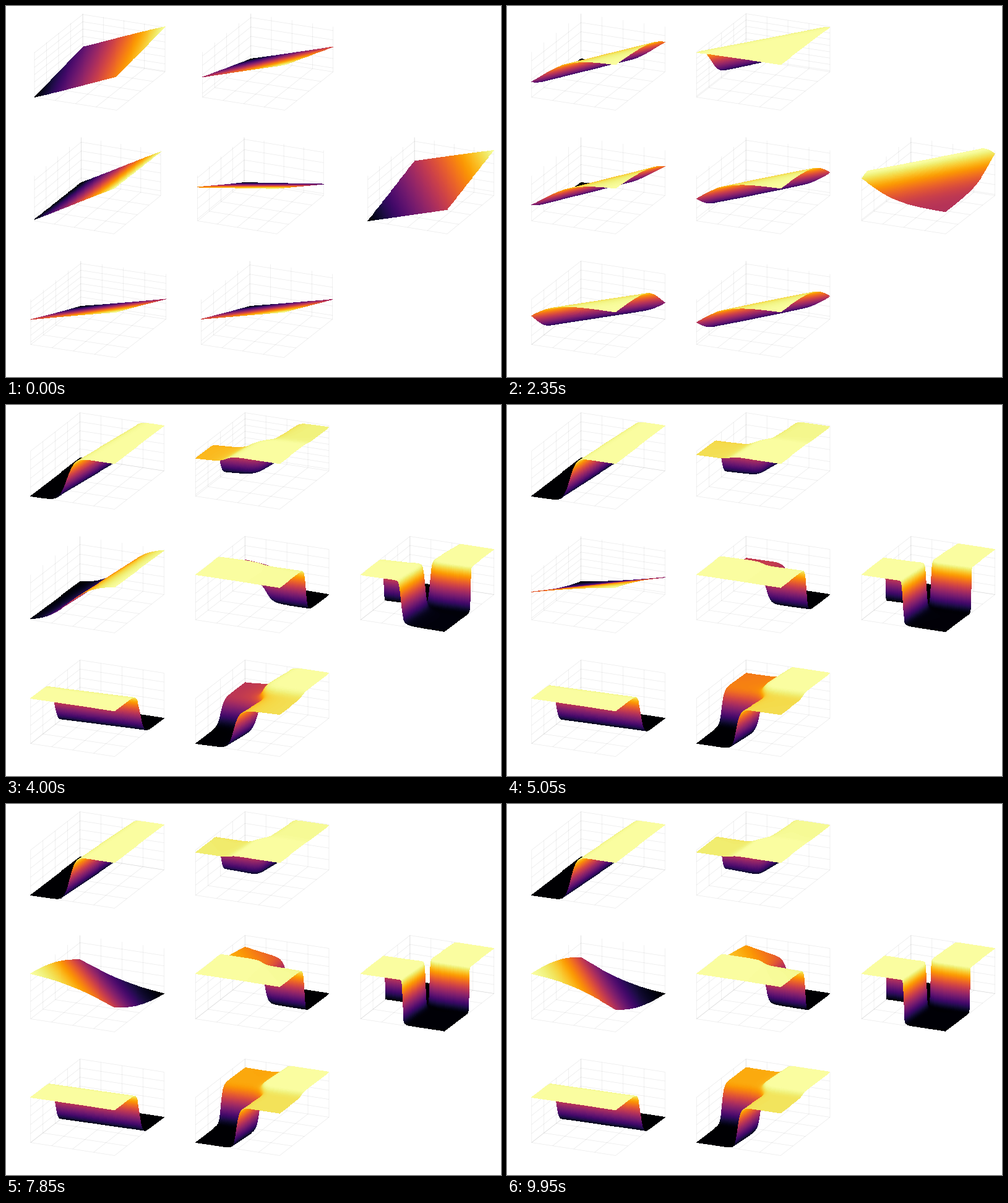
These frames come from a looping animation (800x600 px, 10 s). A matplotlib script:

```python
import matplotlib
import matplotlib.pyplot as plt
import numpy as np
from matplotlib.animation import FuncAnimation
from matplotlib.collections import LineCollection

WIDTH, HEIGHT = 800, 600
FRAMES, INTERVAL = 200, 50

# A 3-3-1 sigmoid network learns XOR over the unit square (a, b).
# Every unit starts as a tilted plane whose direction turns at first.
START_ANGLES = np.radians([20, -2, -51, -39, -71, -52, 42])
TURNED_ANGLES = np.radians([-3, -5, -53, -37, -87, -60, -23])

# First layer slopes: all fold along one diagonal, then split into a and b.
FOLD_1 = np.array([(5.7, -4.4), (5, -3.8), (5.9, -7)])
SPLIT_1 = np.array([(22, -3), (6.3, -.6), (1.3, -26)])
END_1 = np.array([(31, -2), (-3.25, -3.05), (.7, -34)])

# Second layer weights and bias; while folding only gain and bias differ.
FOLD_2 = np.outer([11, 2, 2], [.25, .25, .5, 0]) - np.outer([1, 1, 1], [0, 0, 0, 1])
SPLIT_2 = np.array([(4, .6, 3, -1), (-2.5, -1.5, 9, 0), (5, 1.5, -4, 0)])
END_2 = np.array([(6, .5, 4.2, -1.4), (-6, 2.5, 9.5, 0), (7.6, 0, -6.5, 1.5)])

# Output: the first hidden unit minus the two others.
FOLD_3 = np.array([(2, -1.08, -1.08, 0)])
SPLIT_3 = np.array([(22, -13.5, -13.5, 0)])
END_3 = np.array([(26, -16, -16, 0)])

# Boxes start narrower and widen to a common left and right end.
START_LEFT = np.array([46, 46, 40, 51, 43, 49, 51.5])
START_RIGHT = np.array([257, 250, 258.5, 262, 246.5, 261, 255])
LEFT, RIGHT = 39.8, 255.3
CELLS = [(0, 0), (0, 1), (0, 2), (1, 0), (1, 1), (1, 2), (2, 1)]
COL_STEP, ROW_STEP = 800 / 3, 200

# Oblique projection of the unit box.
SHARE_A, SHARE_B = .63, .37
FLOOR, DROP_A, RISE_B, RISE_Z = 147.5, 21, 62, 73

LUT = matplotlib.colormaps["inferno"](np.arange(256), bytes=True)

# Depth lines, one per pixel column, running from back to front.
COLUMNS, DEPTHS = 220, 120
u = np.linspace(0, 1, COLUMNS)[:, None]
back = np.minimum(1, u / SHARE_B)
front = np.maximum(0, (u - SHARE_A) / SHARE_B)
GRID_B = back + (front - back) * np.linspace(0, 1, DEPTHS + 1)
GRID_A = np.clip((u - SHARE_B * GRID_B) / SHARE_A, 0, 1)
GROUND = FLOOR + DROP_A * GRID_A - RISE_B * GRID_B
SEGMENT_U = np.repeat(u.ravel(), DEPTHS)
POINTS = np.stack([GRID_A.ravel() - .5, GRID_B.ravel() - .5])


def sigmoid(s):
    return 1 / (1 + np.exp(-s))


def progress(t, start, end):
    return min(max((t - start) / (end - start), 0), 1)


def stages(t):
    turn = progress(t, 0, 1600)
    fold = progress(t, 1600, 2350) ** 2
    split = 1 - (1 - progress(t, 2350, 4000)) ** 2
    settle = 1 - np.exp(-max(t - 4000, 0) / 1400)
    return turn, (fold, split, settle)


def pass_through(value, poses, steps):
    for pose, step in zip(poses, steps):
        value = value + (pose - value) * step
    return value


def layer(inputs, poses, steps, planes):
    w = pass_through(0, poses, steps).astype(np.float32)
    return sigmoid(w[:, :-1] @ inputs + w[:, -1:] + planes)


def network(turn, steps):
    angles = START_ANGLES + (TURNED_ANGLES - START_ANGLES) * turn
    slopes = np.stack([np.cos(angles), np.sin(angles)], axis=1)
    w1 = pass_through(slopes[:3], (FOLD_1, SPLIT_1, END_1), steps)
    planes = (slopes[3:] * .7 * (1 - steps[0])) @ POINTS
    h1 = sigmoid(w1 @ POINTS)
    h2 = layer(h1, (FOLD_2, SPLIT_2, END_2), steps, planes[:3])
    out = layer(h2, (FOLD_3, SPLIT_3, END_3), steps, planes[3:])
    return np.concatenate([h1, h2, out])


def paint(image, z, left, width, top):
    y = np.floor(GROUND - RISE_Z * z + top).astype(np.int32)
    start = y[:, :-1].ravel()
    jump = y[:, 1:].ravel() - start
    count = np.maximum(1, np.abs(jump))
    index = np.repeat(np.arange(count.size), count)
    step = np.arange(index.size) - (np.cumsum(count) - count)[index]
    rows = start[index] + np.sign(jump)[index] * step
    cols = (left + SEGMENT_U * width).astype(np.int32)[index]
    shade = z[:, :-1].ravel()
    slope = (z[:, 1:].ravel() - shade) / count
    level = ((shade[index] + slope[index] * step) * 255).astype(np.uint8)
    image[rows, np.minimum(cols, WIDTH - 1)] = LUT[level]


def tick_levels(lo, hi):
    raw = (hi - lo) / 5
    base = 10 ** np.floor(np.log10(raw))
    step = base * min((1, 2, 5, 10), key=lambda m: abs(m - raw / base))
    ticks = np.arange(np.ceil(lo / step - .02), np.floor(hi / step + .02) + 1)
    return np.clip((ticks * step - lo) / (hi - lo), 0, 1)


def grid_lines(left, width, top, levels):
    def path(*points):
        return [(left + width * (SHARE_A * a + SHARE_B * b),
                 top + FLOOR + DROP_A * a - RISE_B * b - RISE_Z * z)
                for a, b, z in points]

    lines = []
    for q in np.linspace(0, 1, 5):
        lines.append(path((q, 0, 0), (q, 1, 0), (q, 1, 1)))
        lines.append(path((1, q, 0), (0, q, 0), (0, q, 1)))
    lines += [path((0, 0, z), (0, 1, z), (1, 1, z)) for z in levels]
    return lines


fig = plt.figure(figsize=(8, 6), dpi=100, facecolor="white")
ax = fig.add_axes([0, 0, 1, 1])
canvas = np.zeros((HEIGHT, WIDTH, 4), np.uint8)
picture = ax.imshow(canvas, extent=(0, WIDTH, HEIGHT, 0), aspect="auto",
                    interpolation="nearest", zorder=2)
grid = LineCollection([], colors=[(0, 0, 0, .085)], linewidths=.5, zorder=1)
ax.add_collection(grid)
ax.set_xlim(0, WIDTH)
ax.set_ylim(HEIGHT, 0)
ax.axis("off")


def draw(i):
    turn, steps = stages(i * INTERVAL)
    values = network(turn, steps)
    lefts = START_LEFT + (LEFT - START_LEFT) * steps[0]
    rights = START_RIGHT + (RIGHT - START_RIGHT) * steps[0]
    image = np.zeros_like(canvas)
    lines = []
    for (col, row), x0, x1, value in zip(CELLS, lefts, rights, values):
        lo, hi = value.min(), value.max()
        z = ((value - lo) / (hi - lo)).reshape(GRID_A.shape)
        left, width, top = x0 + col * COL_STEP, x1 - x0, row * ROW_STEP
        paint(image, z, left, width, top)
        lines += grid_lines(left, width, top, tick_levels(lo, hi))
    picture.set_data(image)
    grid.set_segments(lines)
    return picture, grid


anim = FuncAnimation(fig, draw, frames=FRAMES, interval=INTERVAL,
                     repeat=True, repeat_delay=0)
plt.show()
```
